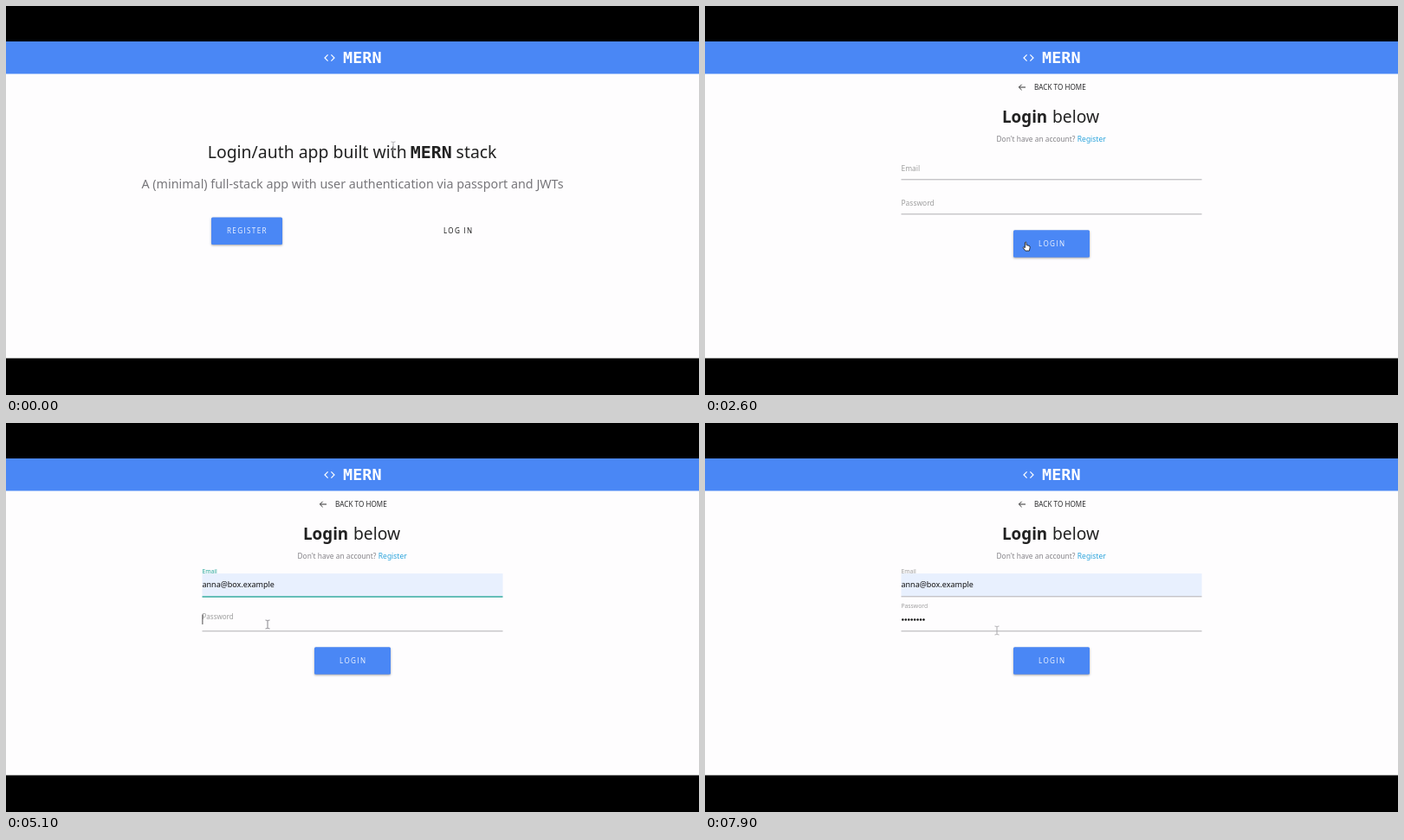
An HTML page with a canvas for the animation above (8000 ms loop, 800 by 450 pixels).

```html
<!DOCTYPE html>
<html lang="en">
<head>
<meta charset="utf-8">
<title>Login flow</title>
<style>
html, body { margin: 0; width: 800px; height: 450px; overflow: hidden; background: #000; }
canvas { display: block; }
</style>
</head>
<body>
<canvas id="stage" width="800" height="450"></canvas>
<script>
const ctx = document.getElementById('stage').getContext('2d');
const LOOP = 8000, STEP = 100;
const SANS = '"Noto Sans", "Open Sans", sans-serif';
const CAPS = '"Open Sans", "Noto Sans", sans-serif';
const MONO = '"DejaVu Sans Mono", monospace';
const BLUE = '#4a87f5', TEAL = [38, 166, 154], GREY = [158, 158, 158], LINE = [176, 174, 178];
const EMAIL = 'anna@box.example';
const LEFT = 226.5, RIGHT = 573.5;

// Moments of the story, in ms
const OPEN = 2000, FOCUS = 3100, FILL = 3600, NEXT = 5060, TYPE = 6200, BLUR = 7300;

// Pointer path: time, x, y
const PATH = [
  [0, 447, 162], [100, 447, 162], [900, 526, 259], [1500, 527, 261], [2000, 527, 261],
  [2500, 371, 278], [2700, 371, 278], [3000, 292, 188], [3500, 292, 188], [3900, 299, 222],
  [4400, 302, 233], [6500, 302, 233], [7000, 334, 291], [7400, 334, 291], [7900, 337, 240]
];

const clamp = v => Math.max(0, Math.min(1, v));
const easeOut = v => 1 - (1 - clamp(v)) ** 1.7;
const smooth = v => v * v * (3 - 2 * v);
const lerp = (a, b, k) => a + (b - a) * k;
const mix = (a, b, k) => `rgb(${a.map((v, i) => Math.round(lerp(v, b[i], k)))})`;

function text(str, x, y, size, color, o = {}) {
  ctx.font = `${o.weight || 400} ${size}px ${o.font || SANS}`;
  ctx.letterSpacing = (o.gap || 0) + 'px';
  ctx.textAlign = o.align || 'left';
  ctx.fillStyle = color;
  ctx.fillText(str, x, y);
  return ctx.measureText(str).width;
}

function stroke(points, color, width) {
  ctx.beginPath();
  points.forEach(([x, y], i) => i ? ctx.lineTo(x, y) : ctx.moveTo(x, y));
  ctx.strokeStyle = color;
  ctx.lineWidth = width;
  ctx.stroke();
}

function rect(x, y, w, h, color) {
  ctx.fillStyle = color;
  ctx.fillRect(x, y, w, h);
}

function button(x, y, w, h, label, labelX) {
  ctx.save();
  ctx.shadowColor = 'rgba(0,0,0,.36)';
  ctx.shadowBlur = 2.5;
  ctx.shadowOffsetY = 1.1;
  ctx.fillStyle = BLUE;
  ctx.beginPath();
  ctx.roundRect(x, y, w, h, 1.5);
  ctx.fill();
  ctx.restore();
  text(label, labelX, y + 18.4, 8.1, '#f4f7ff', { font: CAPS, gap: 1.35 });
}

function frame() {
  rect(0, 0, 800, 450, '#000');
  rect(0, 41, 800, 366.5, '#fefdfe');
  rect(0, 41, 800, 37.5, BLUE);
  stroke([[371.6, 56.4], [368, 60], [371.6, 63.6]], '#fff', 1.2);
  stroke([[375.4, 56.4], [379, 60], [375.4, 63.6]], '#fff', 1.2);
  text('MERN', 389, 66.4, 18.5, '#fff', { font: MONO, weight: 700 });
}

function home() {
  const ink = '#212121';
  text('Login/auth app built with', 232.8, 175.9, 19.4, ink);
  text('MERN', 466.7, 175.9, 20, ink, { font: MONO, weight: 700 });
  text('stack', 519.6, 175.9, 19.4, ink);
  text('A (minimal) full-stack app with user authentication via passport and JWTs',
    400, 210.9, 14.32, '#77767a', { align: 'center' });
  button(237, 244.5, 82, 31.5, 'REGISTER', 255);
  text('LOG IN', 505, 262.9, 8.1, '#111', { font: CAPS, weight: 500, gap: 1.3 });
}

// float: 0 label inside the field, 1 label above; focus: 0 grey, 1 teal
function field(label, mid, float, focus, filled) {
  if (filled) rect(LEFT, mid - 13.2, RIGHT - LEFT, 26.2, '#e8f0fe');
  const y = mid + 13;
  rect(LEFT, y, RIGHT - LEFT, 1 + .4 * focus, mix(LINE, TEAL, focus));
  text(label, LEFT, lerp(mid + 3.7, mid - 13.3, float), lerp(8.45, 6.75, float), mix(GREY, TEAL, focus));
}

function caret(x, mid, since) {
  if (since >= 0 && since % 1000 < 500) rect(x, mid - 6, .8, 11.5, '#222');
}

function login(t) {
  const ink = '#212121';
  stroke([[370, 94], [362.4, 94]], '#333', 1);
  stroke([[365.6, 90.8], [362.4, 94], [365.6, 97.2]], '#333', 1);
  text('BACK TO HOME', 380, 97, 8.13, '#2b2b2d');
  text('Login', 343, 135.3, 18.8, ink, { weight: 700 });
  text('below', 401, 135.3, 19.3, ink);
  text('Don\'t have an account?', 336.5, 157.1, 8.35, '#858388', { weight: 500 });
  text('Register', 429.8, 157.1, 8.5, '#2ca4dc', { weight: 500 });

  const emailOn = clamp((t - FOCUS) / 300) * (1 - clamp((t - NEXT - 40) / 300));
  const passOn = clamp((t - NEXT - 40) / 300) * (1 - clamp((t - BLUR) / 300));
  field('Email', 187.3, easeOut((t - FOCUS) / 200), emailOn, t >= FILL);
  field('Password', 227.3, easeOut((t - NEXT) / 250), passOn, false);

  if (t >= FILL) {
    const w = text(EMAIL, LEFT, 190.4, 9, '#111');
    if (t < NEXT) caret(LEFT + w + .3, 187.5, t - FILL);
  } else caret(LEFT, 187.5, t - FOCUS);

  const dots = Math.max(0, Math.min(8, Math.floor((t - TYPE) / 100) + 1));
  ctx.fillStyle = '#111';
  for (let i = 0; i < dots; i++) {
    ctx.beginPath();
    ctx.arc(228.3 + i * 3.45, 227.4, 1.25, 0, 7);
    ctx.fill();
  }
  if (t < BLUR) {
    if (dots) caret(LEFT + dots * 3.45 + .3, 227.5, (t - TYPE) % 100);
    else caret(LEFT, 227.5, t - NEXT);
  }
  button(356, 259.3, 88, 31.4, 'LOGIN', 385);
}

function position(t) {
  let i = PATH.findIndex(p => p[0] > t);
  if (i < 0) return PATH[PATH.length - 1].slice(1);
  const [t0, x0, y0] = PATH[i - 1], [t1, x1, y1] = PATH[i];
  const k = smooth((t - t0) / (t1 - t0));
  return [lerp(x0, x1, k), lerp(y0, y1, k)];
}

function kind(x, y, t) {
  const inside = (l, a, r, b) => x > l && x < r && y > a && y < b;
  if (t < OPEN) {
    if (inside(488, 244, 556, 276)) return 'hand';
    return inside(156, 155, 644, 216) ? 'beam' : 'arrow';
  }
  if (inside(356, 259, 444, 291)) return 'hand';
  return inside(LEFT, 174, RIGHT, 202) || inside(LEFT, 214, RIGHT, 242) ? 'beam' : 'arrow';
}

function pointer(t) {
  const [x, y] = position(t);
  const shape = kind(x, y, t);
  ctx.save();
  ctx.translate(x, y);
  ctx.lineJoin = 'round';
  if (shape === 'beam') {
    const tone = t < OPEN || t > 7500 ? '#aaa9ac' : '#85848a';
    stroke([[0, -4.5], [0, 4.5]], tone, 1);
    stroke([[-2.5, -5], [-.6, -4.6], [.6, -4.6], [2.5, -5]], tone, .9);
    stroke([[-2.5, 5], [-.6, 4.6], [.6, 4.6], [2.5, 5]], tone, .9);
  } else {
    const hand = 'M-1.6 1V-4.4Q-.8-5.6 0-4.4V-1.4L3-.7Q4.4-.3 4.2 1.2L3.4 5.2H-1.2L-4 1.5Q-3.6 .1-1.6 1.6Z';
    const arrow = 'M-3-5V4L-1 2.2L.6 5.5L2 4.8L.5 1.7H3.2Z';
    const path = new Path2D(shape === 'hand' ? hand : arrow);
    ctx.fillStyle = shape === 'hand' ? '#fff' : '#222';
    ctx.strokeStyle = shape === 'hand' ? '#222' : '#fff';
    ctx.lineWidth = .9;
    ctx.fill(path);
    ctx.stroke(path);
  }
  ctx.restore();
}

const start = performance.now();
function draw(now) {
  const t = Math.floor((Math.max(0, now - start) % LOOP) / STEP) * STEP;
  frame();
  if (t < OPEN) home(); else login(t);
  pointer(t);
  requestAnimationFrame(draw);
}
draw(start);
</script>
</body>
</html>
```
